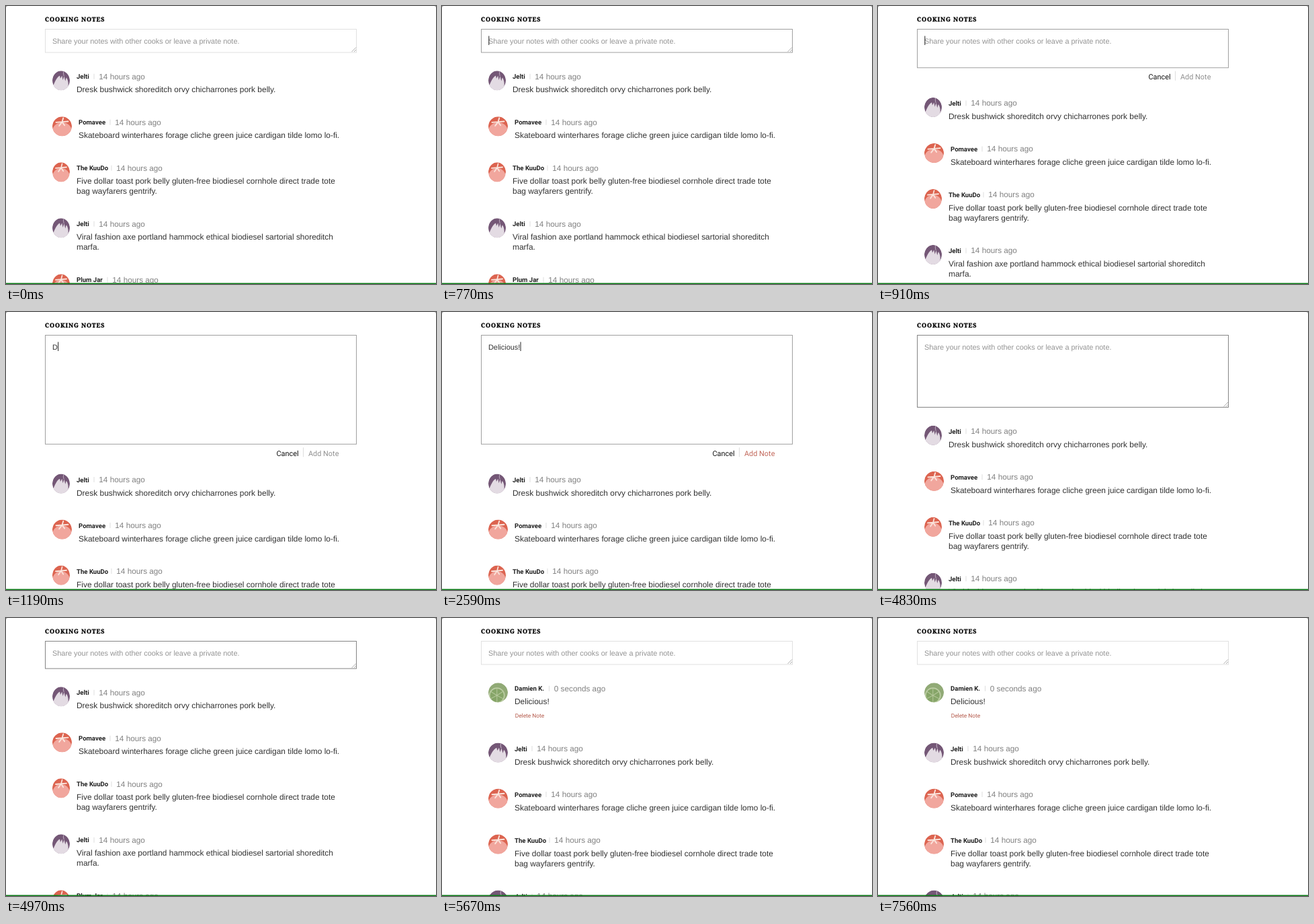
An HTML page that plays this animation: 640 by 413 pixels, repeating every 7.63 s.

```html
<!DOCTYPE html>
<html lang="en">
<head>
<meta charset="utf-8">
<title>Cooking notes</title>
<style>
  html, body { margin: 0; height: 100%; overflow: hidden; background: #fff; }
  svg { display: block; width: 100%; height: 100%; }
  text { font: 11.95px "Liberation Sans", Arial, sans-serif; fill: #333; text-rendering: geometricPrecision; white-space: pre; }
  .title { font: 900 9px "Noto Serif", serif; letter-spacing: .9px; fill: #000; stroke: #000; stroke-width: .3px; }
  .field { font-size: 10.9px; }
  .hint { fill: #949494; }
  .button { font: 10.9px Roboto, sans-serif; fill: #111; }
  .name { font: 700 9.6px Roboto, sans-serif; fill: #222; }
  .time { font-size: 11.75px; fill: #808080; }
  .delete { font: 8.4px Roboto, sans-serif; fill: #b4594a; }
  .rule { stroke: #ddd; }
</style>
</head>
<body>
<svg viewBox="0 0 640 413">
  <defs>
    <clipPath id="disc"><circle r="1"/></clipPath>
    <g id="eggplant" clip-path="url(#disc)">
      <circle r="1" fill="#745776"/>
      <path d="M-1 .75C-.7 .1-.5-.35-.15-.5L-.08-.2 .1-.5 .2-.05 .35-.45 .48 .05 .6-.3C.85 0 .9 .5 .7 1.1H-1Z" fill="#e3dbe3"/>
      <path d="M.3-1Q.2-.7 .33-.45" fill="none" stroke="#b9a5ba" stroke-width=".08"/>
    </g>
    <g id="tomato" clip-path="url(#disc)">
      <circle r="1" fill="#dc6450"/>
      <ellipse cy=".36" rx=".95" ry=".76" fill="#f1a69d"/>
      <path d="M0-.45L-.62-.4M0-.45L-.3-.05M0-.45L.25-.1M0-.45L.62-.5M0-.45L.12-.85" stroke="#fbe5dd" stroke-width=".13" stroke-linecap="round"/>
    </g>
    <g id="lime" clip-path="url(#disc)">
      <circle r="1" fill="#91aa76"/>
      <circle cx="-.12" cy=".3" r=".76" fill="#86a568" stroke="#bccda4" stroke-width=".12"/>
      <path d="M-.12 .3V-.45M-.12 .3L.5-.1M-.12 .3L.55 .65M-.12 .3V1M-.12 .3L-.8 .65M-.12 .3L-.75-.1" stroke="#b4c79a" stroke-width=".07"/>
    </g>
  </defs>

  <rect width="640" height="413" fill="#fff"/>
  <path d="M0 0H2L0 2ZM640 0H638L640 2Z" fill="#aaa"/>
  <text class="title" x="58" y="23">COOKING NOTES</text>

  <rect id="box" x="58.5" y="34.5" width="463" fill="#fff"/>
  <path id="grip" d="M514.5-1L521-7.5M518-1L521-4" stroke="#999" stroke-width=".8"/>
  <text id="hint" class="field hint" x="69" y="56">Share your notes with other cooks or leave a private note.</text>
  <text id="typed" class="field" x="69" y="56"></text>
  <rect id="caret" y="44.5" width="1" height="13.5" fill="#222"/>

  <g id="buttons">
    <text class="button" x="402.5" y="17.3">Cancel</text>
    <path class="rule" d="M442.5 5V19"/>
    <text id="add" class="button" x="450" y="17.3">Add Note</text>
  </g>

  <g id="list"></g>
  <rect y="411.5" width="640" height="1.5" fill="#0b7a16"/>
</svg>

<script>
const LOOP = 7630, MOVE = 300;
const FOCUS = 770, OPEN = 867, ENABLE = 1260, CLOSE = 4753, POSTED = 5110;
const CLOSED_Y = 69, OPEN_Y = 196.3;
const MESSAGE = "Delicious!";
const KEY_TIMES = [1190, 1330, 1470, 1610, 1750, 1890, 1960, 2100, 2240, 2590];

const $ = id => document.getElementById(id);
const show = (element, visible) => element.setAttribute("display", visible ? "inline" : "none");
const between = (t, from, to) => t >= from && t < to;

const notes = [
  { name: "Damien K.", avatar: "lime", rule: 51.5, ago: "0 seconds ago", lines: [MESSAGE], fresh: true },
  { name: "Jelti", avatar: "eggplant", rule: 26, lines: ["Dresk bushwick shoreditch orvy chicharrones pork belly."] },
  { name: "Pomavee", avatar: "tomato", rule: 47, wide: true,
    lines: ["Skateboard winterhares forage cliche green juice cardigan tilde lomo lo-fi."] },
  { name: "The KuuDo", avatar: "tomato", rule: 52,
    lines: ["Five dollar toast pork belly gluten-free biodiesel cornhole direct trade tote", "bag wayfarers gentrify."] },
  { name: "Jelti", avatar: "eggplant", rule: 26,
    lines: ["Viral fashion axe portland hammock ethical biodiesel sartorial shoreditch", "marfa."] },
  { name: "Plum Jar", avatar: "tomato", rule: 46, lines: [] }
];

// Each note is drawn around the vertical centre of its heading.
$("list").innerHTML = notes.map(note => `<g>
  <use href="#${note.avatar}"/>
  <g>
    <text class="name" y="4">${note.name}</text>
    <path class="rule" d="M${note.rule} -3.5V4.5"/>
    <text class="time" x="${note.rule + 7.3}" y="4.3">${note.ago || "14 hours ago"}</text>
    ${note.lines.map((line, i) => `<text y="${24 + 15 * i}">${line}</text>`).join("")}
    ${note.fresh ? '<text class="delete" x=".7" y="44">Delete Note</text>' : ""}
  </g></g>`).join("");

notes.forEach((note, i) => {
  note.group = $("list").children[i];
  [note.picture, note.body] = note.group.children;
  note.height = note.fresh ? 89.3 : 68 + 15 * (note.lines.length - 1);
});

// cubic-bezier(.25, .1, .25, 1)
function ease(x) {
  if (x <= 0 || x >= 1) return x <= 0 ? 0 : 1;
  const curve = (s, a, b) => 3 * a * s * (1 - s) ** 2 + 3 * b * s * s * (1 - s) + s ** 3;
  let low = 0, high = 1;
  for (let i = 0; i < 20; i++) {
    const middle = (low + high) / 2;
    if (curve(middle, .25, .25) < x) low = middle; else high = middle;
  }
  return curve(low, .1, 1);
}

function drawField(t, bottom, active) {
  const focused = between(t, FOCUS, CLOSE + MOVE);
  const text = t < CLOSE ? MESSAGE.slice(0, KEY_TIMES.filter(time => t >= time).length) : "";
  $("box").setAttribute("height", bottom - 34.5);
  $("box").setAttribute("stroke", !focused ? "#e0e0e0" : t < CLOSE ? "#a0a0a0" : "#858585");
  $("grip").setAttribute("transform", `translate(0 ${bottom})`);
  show($("grip"), !active);
  show($("hint"), !text);
  $("typed").textContent = text;
  $("caret").setAttribute("x", 69.3 + (text ? $("typed").getComputedTextLength() : 0));
  show($("caret"), between(t, FOCUS, 3150) || between(t, 3640, 4200) || between(t, 4690, CLOSE));
  $("buttons").setAttribute("transform", `translate(0 ${bottom})`);
  show($("buttons"), active);
  $("add").style.fill = t < ENABLE ? "#909090" : "#c2675a";
}

function drawNotes(top, posted) {
  let y = top;
  for (const note of notes) {
    const visible = posted || !note.fresh;
    show(note.group, visible);
    if (!visible) continue;
    const width = posted || note.wide ? 29 : 26;
    note.group.setAttribute("transform", `translate(0 ${y})`);
    note.picture.setAttribute("transform", `translate(${69 + width / 2} 6.5) scale(${width / 2} 14.5)`);
    note.body.setAttribute("transform", `translate(${79 + width} 0)`);
    y += note.height;
  }
}

const start = performance.now();
function frame() {
  const t = (performance.now() - start) % LOOP;
  const active = between(t, OPEN, CLOSE);
  const openness = ease((t - OPEN) / MOVE) - ease((t - CLOSE) / MOVE);
  const bottom = CLOSED_Y + (OPEN_Y - CLOSED_Y) * openness;
  drawField(t, bottom, active);
  drawNotes(bottom + 35.2 + (active ? 17 : 0), t >= POSTED);
  requestAnimationFrame(frame);
}
frame();
</script>
</body>
</html>
```
